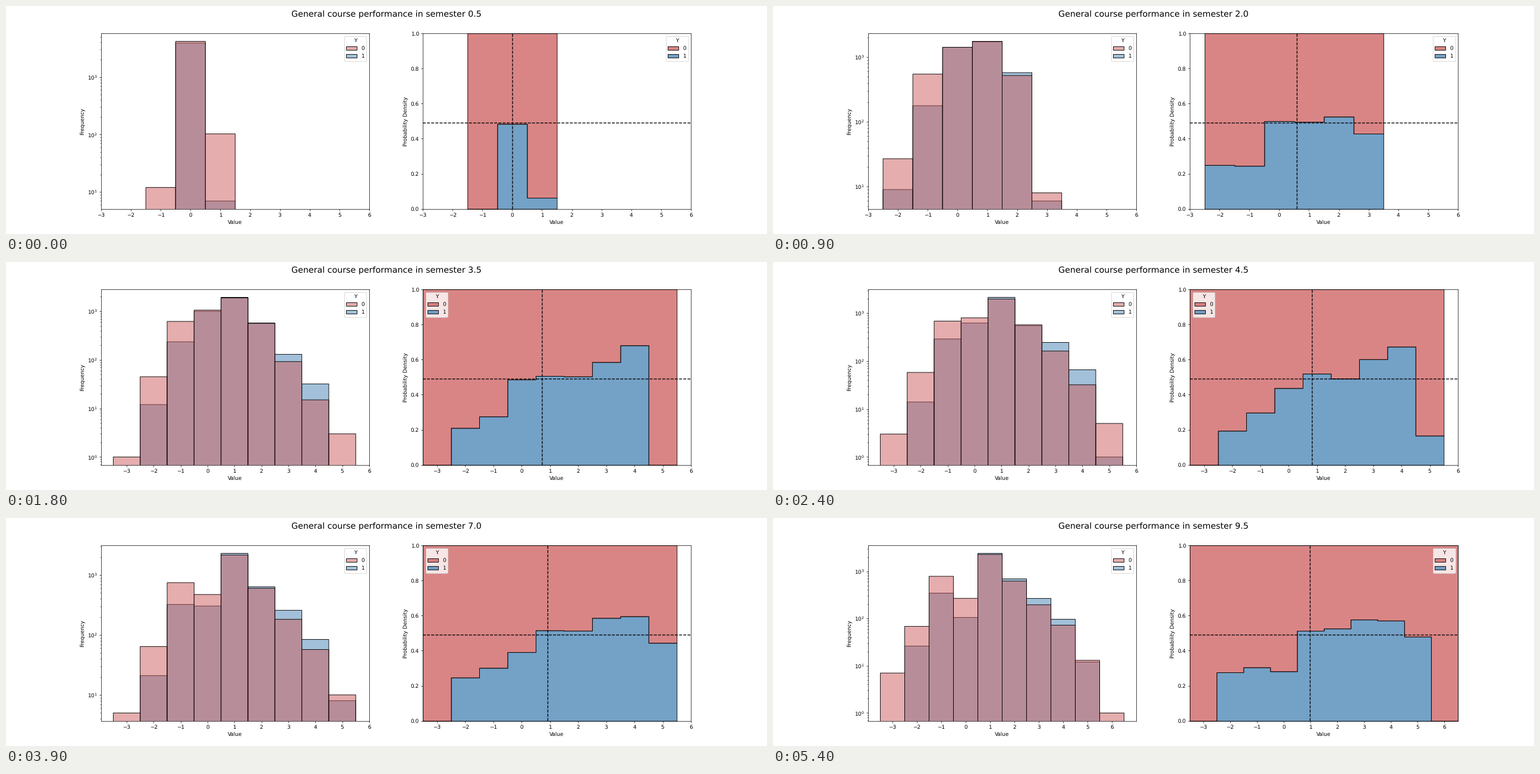
These frames come from a looping animation (1280 by 384 pixels, 5700 ms). A matplotlib script:

```python
import numpy as np
import matplotlib.pyplot as plt
from matplotlib.animation import FuncAnimation
from matplotlib.colors import to_rgba
from matplotlib.patches import Patch

plt.rcParams["text.hinting"] = "no_hinting"

COLORS = ("indianred", "steelblue")
STUDENTS = (4290, 3926)
VALUES = np.arange(-3, 7)
SHARE = 0.4895  # reference line for Y = 1

# Students per value at the key semesters. Shorter paths start later;
# everybody not listed has the value 1.
KEYS = (0.5, 2, 3, 4.5, 9.5)
PATHS = (
    {-3: (3, 7), -2: (27, 34, 58, 68), -1: (12, 548, 566, 682, 782),
     0: (4175, 1425, 1283, 800, 267), 2: (522, 560, 570, 620),
     3: (8, 32, 162, 195), 4: (1, 32, 72), 5: (1, 5, 13), 6: (0.75,)},
    {-2: (9, 10, 14, 26), -1: (178, 190, 289, 343),
     0: (3919, 1425, 1330, 622, 105), 2: (578, 594, 551, 688),
     3: (6, 30, 245, 266), 4: (2, 66, 96), 5: (1, 12)},
)

fig, (ax_count, ax_share) = plt.subplots(1, 2, figsize=(20, 6), dpi=64)
title = fig.suptitle("", fontsize=16)


def stage_at(semester):
    """Position among the key semesters, easing out towards each one."""
    i = min(np.searchsorted(KEYS, semester, side="right"), len(KEYS) - 1) - 1
    part = (semester - KEYS[i]) / (KEYS[i + 1] - KEYS[i])
    return i + part ** 0.7


def counts_at(stage, paths, students):
    counts = np.zeros(len(VALUES))
    for value, path in paths.items():
        points = (0,) * (len(KEYS) - len(path)) + path
        counts[value - VALUES[0]] = np.interp(stage, range(len(KEYS)), points)
    counts = np.rint(counts)
    counts[1 - VALUES[0]] = students - counts.sum()
    return counts


def add_legend(ax, alpha, loc):
    handles = [Patch(facecolor=to_rgba(c, alpha), edgecolor="black", linewidth=1)
               for c in COLORS]
    ax.legend(handles, ["0", "1"], title="Y", loc=loc)


def finish(ax, ylabel, low, high):
    ax.set_xticks(VALUES)
    ax.set_xlim(min(low, -3), max(high, 6))
    ax.set_xlabel("Value")
    ax.set_ylabel(ylabel)


def draw_counts(counts, low, high):
    ax = ax_count
    ax.clear()
    ax.set_yscale("log")
    for color, heights in zip(COLORS[::-1], counts[::-1]):
        used = heights > 0
        ax.bar(VALUES[used], heights[used], width=1, linewidth=1, snap=False,
               facecolor=to_rgba(color, 0.5), edgecolor="black")
    present = np.concatenate(counts)
    present = present[present > 0]
    bottom, top = present.min(), present.max()
    pad = (top / bottom) ** 0.05
    ax.set_ylim(bottom / pad, top * pad)
    margin = 0.05 * (high - low)
    finish(ax, "Frequency", low - margin, high + margin)
    add_legend(ax, 0.5, "upper right")


def draw_shares(counts, low, high):
    ax = ax_share
    ax.clear()
    total = counts[0] + counts[1]
    used = total > 0
    share = counts[1][used] / total[used]
    share = np.append(share, share[-1])
    edges = np.arange(low, high + 0.5)
    for color, base, top in ((COLORS[1], 0, share), (COLORS[0], share, 1)):
        ax.fill_between(edges, base, top, step="post", linewidth=1, snap=False,
                        facecolor=to_rgba(color, 0.75), edgecolor="black")
    dashed = dict(color="black", linestyle="--", snap=False)
    ax.axhline(SHARE, **dashed)
    ax.axvline((VALUES * total).sum() / total.sum(), **dashed)
    ax.set_ylim(0, 1)
    finish(ax, "Probability Density", low, high)

    # Keep the legend clear of the vertical outer edges.
    if high != 5.5:
        loc = "upper right"
    else:
        loc = "upper left" if low < -3 else "lower center"
    add_legend(ax, 0.75, loc)


def update(frame):
    semester = 0.5 + 0.5 * frame
    title.set_text(f"General course performance in semester {semester:.1f}")
    stage = stage_at(semester)
    counts = [counts_at(stage, *group) for group in zip(PATHS, STUDENTS)]
    present = VALUES[counts[0] + counts[1] > 0]
    low, high = present[0] - 0.5, present[-1] + 0.5
    draw_counts(counts, low, high)
    draw_shares(counts, low, high)
    return []


anim = FuncAnimation(fig, update, frames=19, interval=300, repeat=True,
                     repeat_delay=0, init_func=lambda: update(0))
plt.show()
```
